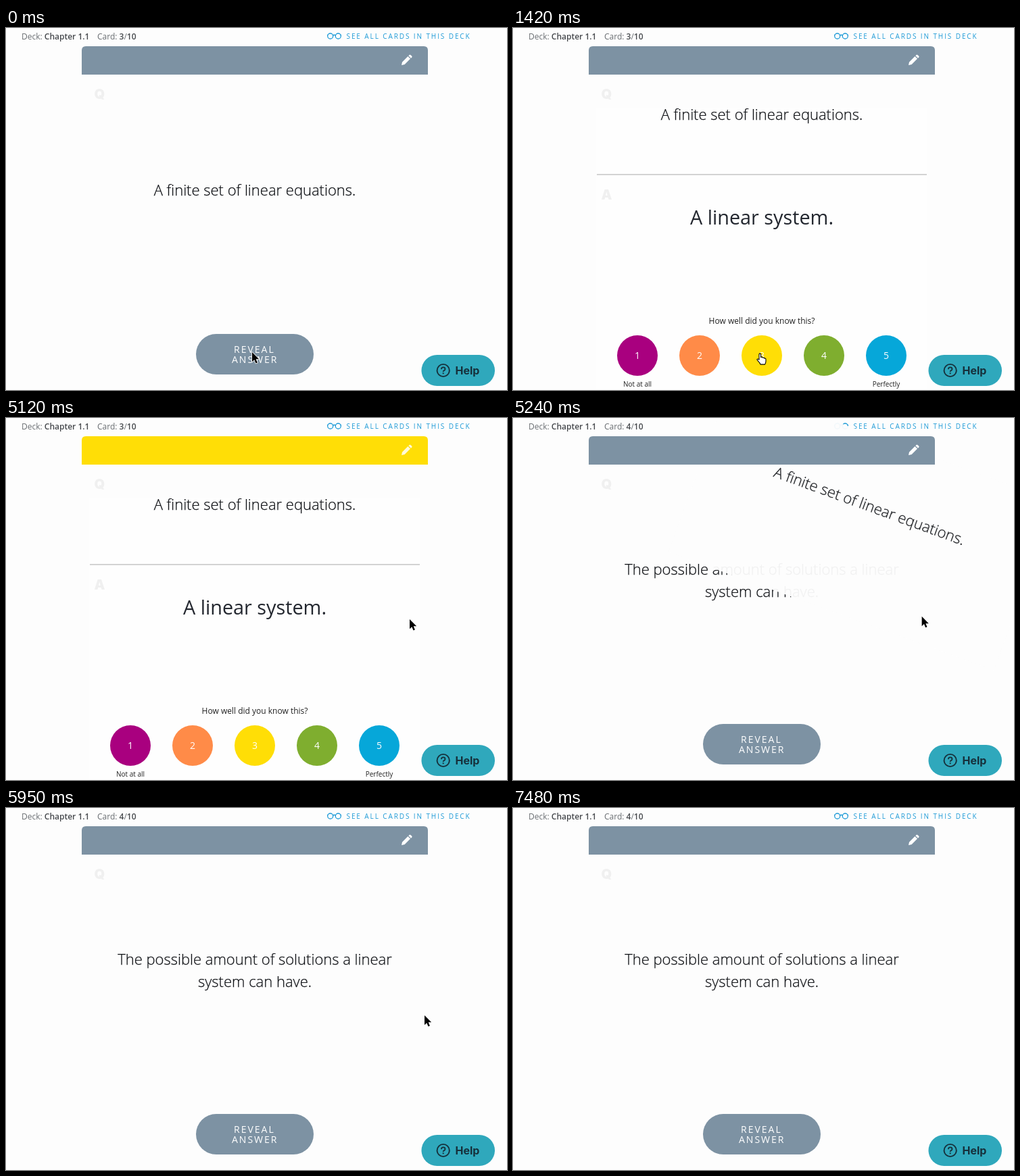
Recreate the animation shown at these times as an HTML page. Size 741 px wide and 536 px high, loop 7.96 s.

```html
<!DOCTYPE html>
<html lang="en">
<head>
<meta charset="utf-8">
<title>Flashcards</title>
<style>
  html, body { margin: 0; width: 100%; height: 100%; overflow: hidden; background: #fdfdfd; }
  svg { display: block; width: 741px; height: 536px; font-family: "Open Sans", sans-serif; }
  .mid { text-anchor: middle; }
  .meta { font-size: 12px; fill: #6a6e72; }
  .meta tspan { font-weight: 600; fill: #46494d; }
  .link { font-size: 10px; letter-spacing: 1.9px; fill: #1f9bd7; }
  .question { font-size: 22px; font-weight: 300; fill: #121418; stroke: #121418; stroke-width: .25px; }
  .answer { font-size: 28.8px; fill: #23272f; }
  .mark { font: 900 20px Inter, sans-serif; fill: #f0f0f0; }
  .button { font-size: 14px; letter-spacing: 2px; fill: #fff; }
  .prompt { font-size: 12px; fill: #222; }
  .scale { font-size: 10px; fill: #222; }
  .rate { font-size: 14px; font-weight: 500; fill: #fff; }
  .help { font: 700 16px Inter, sans-serif; fill: #16303b; }
</style>
</head>
<body>
<svg viewBox="0 0 741 536">
  <text class="meta" x="23" y="17">Deck: <tspan>Chapter 1.1</tspan></text>
  <text class="meta" x="135" y="17">Card: <tspan id="count">3</tspan>/<tspan>10</tspan></text>
  <g fill="none" stroke="#1f9bd7" stroke-width="1.3">
    <circle cx="479.7" cy="12" r="4"/>
    <circle cx="491.3" cy="12" r="4"/>
    <path d="M475 10.5h1M483.5 11q2-1.5 4 0M495 10.5h1"/>
  </g>
  <text class="link" x="503.5" y="16">SEE ALL CARDS IN THIS DECK</text>

  <text class="mark" x="130.5" y="105">Q</text>

  <g id="front">
    <text class="question mid" id="first" x="368" y="248">A finite set of linear equations.</text>
    <g class="question mid" id="second">
      <text x="368" y="232">The possible amount of solutions a linear</text>
      <text x="368" y="265">system can have.</text>
    </g>
    <rect x="281" y="453" width="174" height="60" rx="30" fill="#7d92a3"/>
    <text class="button" x="337" y="481">REVEAL</text>
    <text class="button" x="334" y="496">ANSWER</text>
  </g>

  <g id="back">
    <rect x="123" y="119" width="490" height="415" fill="#fefefe"/>
    <text class="question mid" x="368" y="136">A finite set of linear equations.</text>
    <path d="M124 217H612" stroke="#d3d3d3" stroke-width="2"/>
    <text class="mark" x="130.5" y="254">A</text>
    <text class="answer mid" x="368" y="291">A linear system.</text>
    <text class="prompt mid" x="368" y="438">How well did you know this?</text>
    <g id="rates" class="rate mid"></g>
    <text class="scale mid" x="184" y="531">Not at all</text>
    <text class="scale mid" x="552" y="531">Perfectly</text>
  </g>

  <g id="flyer">
    <rect x="-256" y="-133" width="512" height="266" fill="#fdfdfd"/>
    <text class="question mid" y="-25">A finite set of linear equations.</text>
  </g>

  <path id="header" d="M112 69V33q0-6 6-6H618q6 0 6 6V69z"/>
  <path d="M585 55l1-4.6 8.4-8.4 3.6 3.6-8.4 8.4zM595.3 41.1l1.2-1.2q1-.8 2 0l1.7 1.7q.8 1 0 2l-1.2 1.2z" fill="#fff" id="pencil"/>

  <rect x="614.5" y="484" width="108.5" height="46" rx="23" fill="#2fa8bc"/>
  <circle cx="646.7" cy="507" r="9.1" fill="none" stroke="#16303b" stroke-width="1.9"/>
  <path d="M643.9 505.2q0-2.8 2.8-2.8t2.8 2.5q0 1.4-1.5 2.2t-1.3 1.9" fill="none" stroke="#16303b" stroke-width="1.8"/>
  <circle cx="646.7" cy="511.3" r="1.15" fill="#16303b"/>
  <text class="help" x="664.5" y="512.5">Help</text>

  <g id="cursor" stroke-linejoin="round">
    <path id="arrow" d="M0 0V14.3L3.3 11.2 5.5 16.4 7.9 15.4 5.7 10.3H10.2z" fill="#000" stroke="#fff" stroke-width="1.6" paint-order="stroke"/>
    <path id="hand" d="M0 8.5V2Q0 .4 1.3 .4T2.6 2V6Q5 5 5.3 6.8Q7.5 6 7.8 7.7Q10 7.2 10 9.2V12Q10 14 8.6 16.6H2Q1.5 14.6-1.5 11.6Q-3.5 9.6-3 8.8-2 7.8 0 9.6z" fill="#fff" stroke="#000" stroke-width="1.1"/>
  </g>
</svg>
<script>
const $ = id => document.getElementById(id);
const LOOP = 7960, SLATE = "#7d92a3", YELLOW = "#ffde06";
const REVEAL = 1070, RATED = 4180, LEAVE = 4760, NEXT = 5240, GONE = 7480;

["#a9007f", "#ff8b48", YELLOW, "#7fae2f", "#06a7d9"].forEach((color, i) => {
  const x = 184 + 92 * i;
  $("rates").innerHTML += `<circle cx="${x}" cy="485" r="30" fill="${color}"/><text x="${x}" y="489.5">${i + 1}</text>`;
});

// Bursts of redraws: first time, last time, steps; times fall on whole 10 ms
const bursts = [[1070, 1420, 4], [4180, 4180, 1], [4650, 5360, 7], [5480, 5710, 3],
  [5950, 6180, 3], [6540, 7250, 7], [7360, 7480, 2]];
const ticks = [0, ...bursts.flatMap(([from, to, n]) =>
  Array.from({ length: n }, (_, i) =>
    Math.floor((from + (to - from) * i / Math.max(1, n - 1)) / 10) * 10))];

// Pointer path: time, x, y
const path = [[0, 364, 480], [1069, 364, 480], [1070, 364, 481.5], [4530, 364, 481.5],
  [4650, 368, 480], [4760, 394, 450], [4880, 448, 390], [5000, 545, 325], [5120, 597, 298],
  [5360, 612.3, 289.7], [5480, 613, 294], [5710, 613, 300], [5950, 619, 307], [6180, 644, 329],
  [6540, 654, 362], [6770, 668, 410], [7010, 682, 466], [7250, 692, 518], [7360, 698, 525]];

function along(points, t) {
  const i = points.findIndex(p => p[0] > t);
  if (i < 0) return points.at(-1).slice(1);
  const [a, b] = [points[i - 1], points[i]];
  const k = (t - a[0]) / (b[0] - a[0]);
  return a.slice(1).map((v, j) => v + (b[j + 1] - v) * k);
}

const show = (id, on) => $(id).style.display = on ? "" : "none";

function draw(now) {
  const time = now % LOOP;
  const t = ticks.findLast(tick => tick <= time);
  const next = t >= NEXT;

  $("count").textContent = next ? 4 : 3;
  show("first", !next);
  show("second", next);
  show("front", t < 1420 || next);
  show("back", t >= REVEAL && !next);
  $("back").style.opacity = Math.min(1, .3 + .7 * (t - REVEAL) / 350);

  const rated = t >= RATED && !next;
  $("header").setAttribute("fill", rated ? YELLOW : SLATE);
  $("pencil").style.opacity = rated ? .85 : 1;

  // The answered card rolls away to the right
  const roll = (t - 5120) / 240;
  show("flyer", next && roll < 2);
  $("flyer").style.opacity = Math.max(0, 1 - .2 * roll * roll);
  $("flyer").setAttribute("transform", `translate(${368 + 296 * roll} 161) rotate(${40 * roll})`);

  const [x, y] = along(path, t);
  const hand = t >= REVEAL && t < LEAVE;
  show("cursor", t < GONE);
  show("hand", hand);
  show("arrow", !hand);
  $("cursor").setAttribute("transform", `translate(${x} ${y})`);
}

const start = performance.now();
function frame() {
  draw(performance.now() - start);
  requestAnimationFrame(frame);
}
frame();
</script>
</body>
</html>
```
